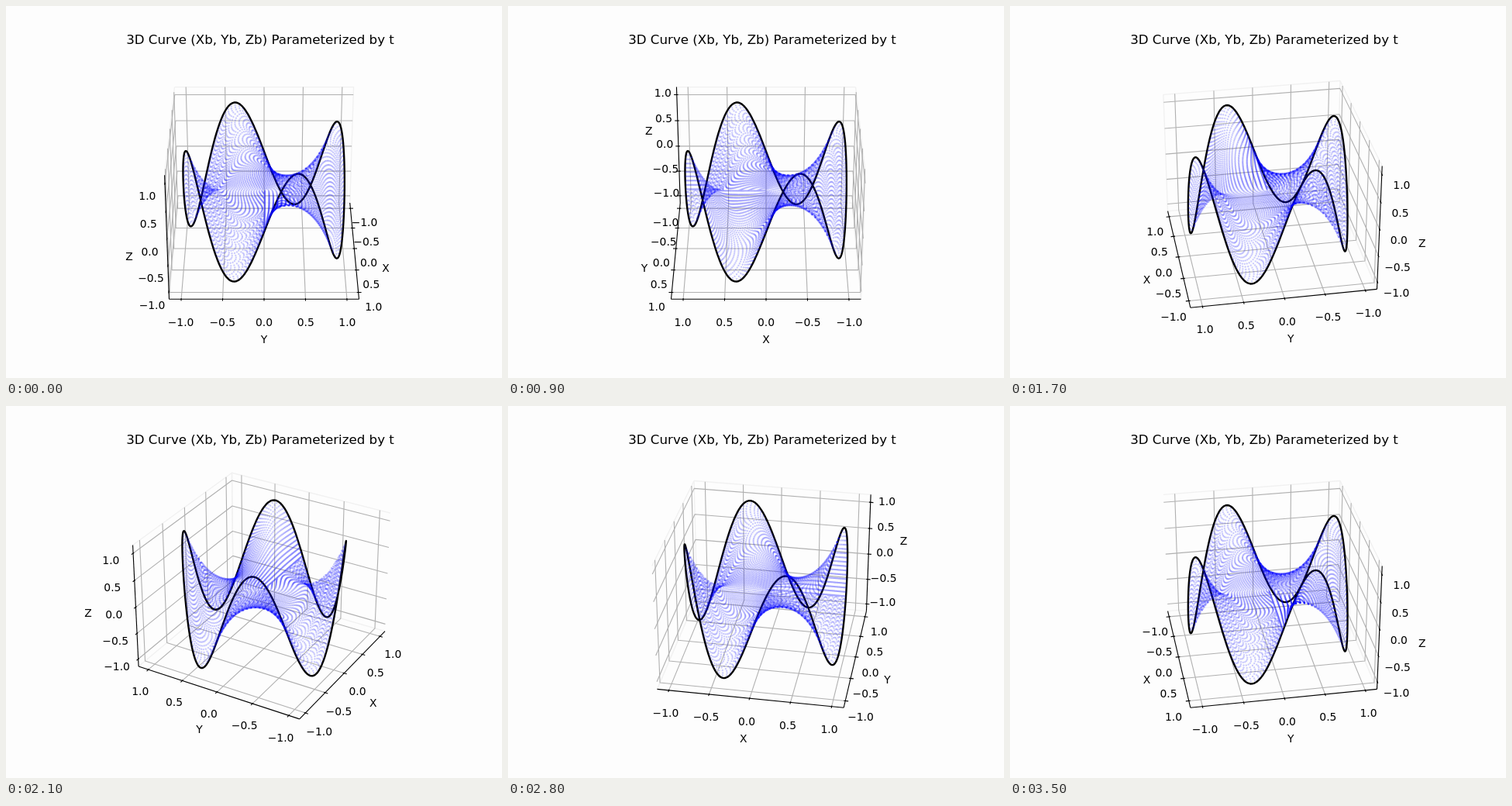
These frames come from a looping animation (640x480 px, 3.6 s). An HTML page with a canvas:

```html
<!DOCTYPE html>
<html lang="en">
<head>
<meta charset="utf-8">
<title>Rotating 3D curve</title>
<style>
  html, body { margin: 0; width: 100%; height: 100%; overflow: hidden; background: #fdfdfd; }
  canvas, svg { position: absolute; left: 0; top: 0; width: 640px; height: 480px; }
  text { font: 13.889px "DejaVu Sans", sans-serif; text-anchor: middle; fill: #000; }
  .title { font-size: 16.667px; }
</style>
</head>
<body>
<canvas width="640" height="480"></canvas>
<svg viewBox="0 0 640 480">
  <text class="title" x="328" y="49">3D Curve (Xb, Yb, Zb) Parameterized by t</text>
</svg>
<script>
const ctx = document.querySelector('canvas').getContext('2d');
const svg = document.querySelector('svg');

const STEP = 100, STEPS = 36;
const LIMIT = 1.1 * 25 / 24;            // axis range is -LIMIT..LIMIT
const DELTA = 0.16 * LIMIT;             // unit for tick and label offsets
const TICK_PAD = 1.0372 * DELTA;
const NAME_PAD = 2.2548 * DELTA;
const TICKS = [-1, -0.5, 0, 0.5, 1];
const NAMES = ['X', 'Y', 'Z'];
const SIDE = 0.51948, HEIGHT = 0.38961; // box size per data unit
const DIST = 10, SCALE = 1997.84, CX = 333, CY = 237.4;
const SIN_E = 0.5, COS_E = Math.sqrt(0.75);
const RINGS = 100, POINTS = 240;

let sinA = 0, cosA = 1;

function project([x, y, z]) {
  const toward = (x * cosA + y * sinA) * SIDE;
  const right = (y * cosA - x * sinA) * SIDE;
  const up = z * HEIGHT;
  const k = SCALE / (DIST - toward * COS_E - up * SIN_E);
  return [CX + right * k, CY - (up * COS_E - toward * SIN_E) * k];
}

function line(points, color, width) {
  ctx.strokeStyle = color;
  ctx.lineWidth = width;
  ctx.beginPath();
  for (const p of points) ctx.lineTo(...project(p));
  ctx.stroke();
}

// Copy of a point with one coordinate replaced
function put(point, axis, value) {
  const p = point.slice();
  p[axis] = value;
  return p;
}

// Push a point away from the centre on every axis but one
function outward(point, axis, pad) {
  return point.map((v, i) => i === axis ? v : v + Math.sign(v) * pad);
}

function makeText(content) {
  const el = document.createElementNS('http://www.w3.org/2000/svg', 'text');
  el.textContent = content;
  return svg.appendChild(el);
}

function placeText(el, point, drop) {
  const [x, y] = project(point);
  el.setAttribute('x', x.toFixed(1));
  el.setAttribute('y', Math.round(y + drop));
}

const labels = NAMES.map(name => ({
  name: makeText(name),
  ticks: TICKS.map(t => makeText(t.toFixed(1).replace('-', '\u2212')))
}));

function drawPanes(far) {
  for (const axis of [0, 1]) {
    const other = 1 - axis;
    const a = put(far, other, -LIMIT), b = put(far, other, LIMIT);
    line([a, b, put(b, 2, LIMIT), put(a, 2, LIMIT)], '#f1f1f1', 1.39);
  }
}

function drawGrid(far, near) {
  for (let axis = 0; axis < 3; axis++) {
    const u = (axis + 1) % 3, v = (axis + 2) % 3;
    for (const t of TICKS) {
      const p = put(far, axis, t);
      line([put(p, u, near[u]), p, put(p, v, near[v])], '#b0b0b0', 1.11);
    }
  }
}

function drawAxes(far, near) {
  const edges = [
    [0, near[1], far[2]],
    [near[0], 0, far[2]],
    [near[0], far[1], 0]
  ];
  edges.forEach((edge, axis) => {
    line([put(edge, axis, -LIMIT), put(edge, axis, LIMIT)], '#000', 1.11);
    const dir = axis === 0 ? 1 : 0;
    const sign = Math.sign(edge[dir]);
    TICKS.forEach((t, i) => {
      const p = put(edge, axis, t);
      const inner = put(p, dir, p[dir] - sign * 0.1 * DELTA);
      const outer = put(p, dir, p[dir] + sign * 0.2 * DELTA);
      line([inner, outer], '#000', 1.11);
      placeText(labels[axis].ticks[i], outward(p, axis, TICK_PAD), 10.6);
    });
    placeText(labels[axis].name, outward(edge, axis, NAME_PAD), 4);
  });
}

// Saddle z = r^4 sin 4t at a fixed radius
function ring(r) {
  return Array.from({ length: POINTS + 1 }, (_, i) => {
    const t = 2 * Math.PI * i / POINTS;
    return [r * Math.cos(t), r * Math.sin(t), r ** 4 * Math.sin(4 * t)];
  });
}

const rim = ring(1);
const rings = Array.from({ length: RINGS - 1 }, (_, i) => ring((i + 1) / RINGS));

function draw(step) {
  const angle = step * 2 * Math.PI / STEPS;
  sinA = Math.sin(angle);
  cosA = Math.cos(angle);
  const near = [cosA, sinA, 1].map(v => v < -1e-9 ? -LIMIT : LIMIT);
  const far = near.map(v => -v);

  ctx.clearRect(0, 0, 640, 480);
  ctx.lineJoin = 'round';
  drawPanes(far);
  drawGrid(far, near);
  drawAxes(far, near);

  line(rim, '#000', 2.4);
  ctx.setLineDash([2.08, 3.44]);
  for (const points of rings) line(points, 'rgba(0, 0, 255, 0.2)', 2.08);
  ctx.setLineDash([]);
}

let shown = -1;
function tick() {
  const step = Math.floor(performance.now() / STEP) % STEPS;
  if (step !== shown) draw(shown = step);
  requestAnimationFrame(tick);
}
tick();
</script>
</body>
</html>
```
